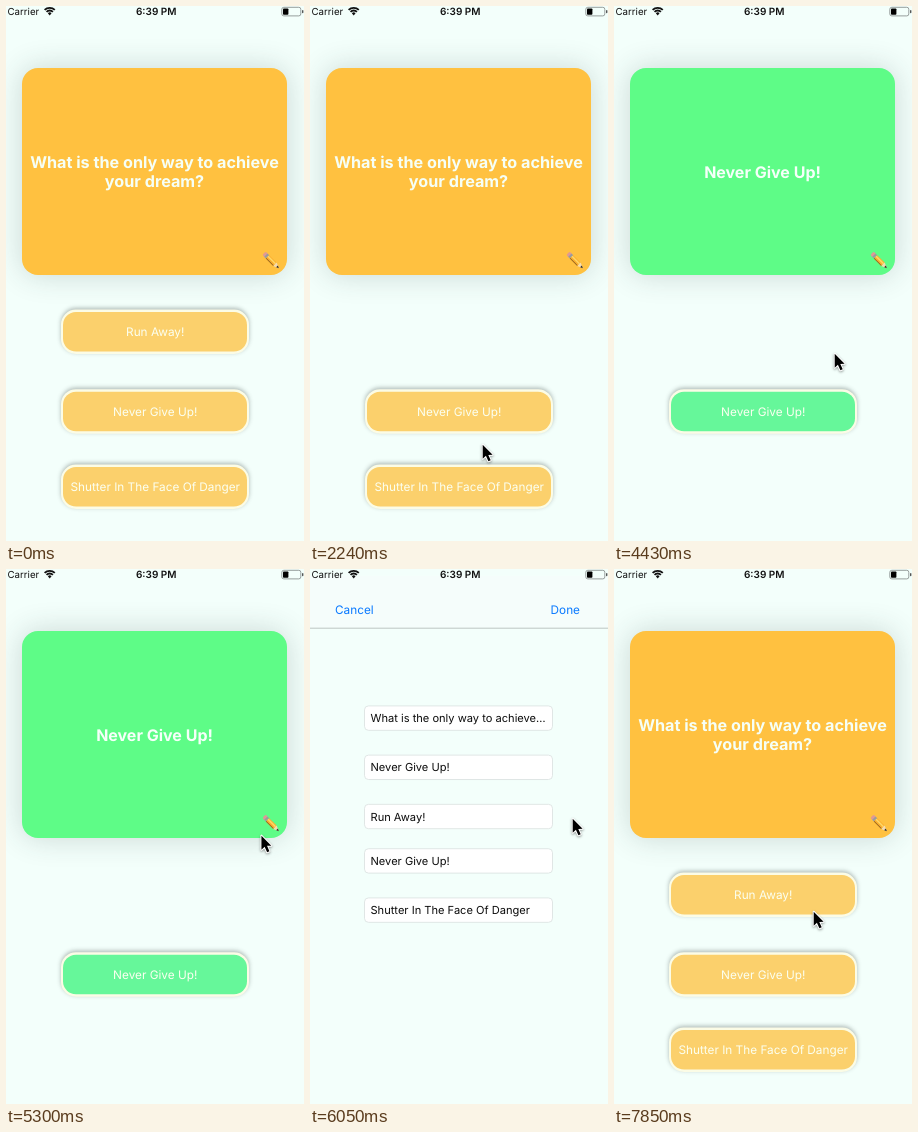
These frames come from a looping animation (298 px wide and 535 px high, 8000 ms). An HTML page with a canvas:

```html
<!DOCTYPE html>
<html lang="en">
<head>
<meta charset="utf-8">
<title>Flashcards</title>
<style>
html, body { margin: 0; width: 298px; height: 535px; overflow: hidden; background: #f3fffb; }
canvas { display: block; width: 298px; height: 535px; }
</style>
</head>
<body>
<canvas id="stage"></canvas>
<script>
const W = 298, H = 535, LOOP = 8000;
const canvas = document.getElementById('stage');
const c = canvas.getContext('2d');
const scale = window.devicePixelRatio || 1;
canvas.width = W * scale;
canvas.height = H * scale;

const BG = '#f3fffb', YELLOW = '#ffc140', GREEN = '#5efc87';
const PALE_YELLOW = '#fbd06c', PALE_GREEN = '#66f79a', BLUE = '#0a7aff';
const QUESTION = ['What is the only way to achieve', 'your dream?'];
const RIGHT = 'Never Give Up!', WRONG_A = 'Run Away!', WRONG_B = 'Shutter In The Face Of Danger';

const START = 300, STEP = 148.04, SLACK = 30;
const TAP_A = 1600, TAP_B = 2900, TAP_RIGHT = 3950;
const OPEN = 5652.7, TAP_DONE = 7050, CLOSE = 7258;

// The screen refreshes at a steady, low rate.
const refresh = t => t < START ? 0 : START + Math.floor((t - START + SLACK) / STEP) * STEP;

function ease(t, from, to) {
  const k = Math.min(1, Math.max(0, (t - from) / (to - from)));
  return k * k * (3 - 2 * k);
}

// Pointer moves: start, end, x, y
const moves = [
  [300, 1340, 174, 324],
  [2090, 2220, 172, 438],
  [2240, 2540, 172, 516],
  [2540, 2840, 172, 491],
  [3270, 3710, 171, 410],
  [4150, 4440, 220, 347],
  [4450, 5450, 262, 249],
  [6080, 6510, 248, 29],
  [6700, 7100, 246, 26],
  [7420, 7850, 199, 342],
];

function pointerAt(t) {
  let x = 290, y = 222;
  for (const [from, to, tx, ty] of moves) {
    const k = ease(t, from, to);
    x += (tx - x) * k;
    y += (ty - y) * k;
  }
  return [x, y];
}

function sheetTop(t) {
  if (t < OPEN) return H;
  return t < CLOSE ? H * Math.exp((OPEN - t) / 105) : H * ease(t, CLOSE, CLOSE + 342);
}

function box(x, y, w, h, r, fill) {
  c.beginPath();
  c.roundRect(x, y, w, h, r);
  c.fillStyle = fill;
  c.fill();
}

function text(str, x, cy, size, color, weight = 400, align = 'center') {
  c.font = `${weight} ${size}px Inter, "Open Sans", sans-serif`;
  c.textRendering = 'geometricPrecision';
  c.textAlign = align;
  c.fillStyle = color;
  c.fillText(str, x, cy + size * 0.37);
}

function shadow(color, blur, dy = 0) {
  c.shadowColor = color;
  c.shadowBlur = blur * scale;
  c.shadowOffsetY = dy * scale;
}

function statusBar() {
  text('Carrier', 1.5, 5.6, 9.7, '#111', 400, 'left');
  text('6:39 PM', 150.2, 5.6, 10, '#111', 600);
  c.strokeStyle = c.fillStyle = '#111';
  c.lineWidth = 1.8;
  for (const r of [7.2, 4.5]) {
    c.beginPath();
    c.arc(43.7, 9, r, -Math.PI * 0.75, -Math.PI * 0.25);
    c.stroke();
  }
  c.beginPath();
  c.moveTo(43.7, 9.4);
  c.arc(43.7, 9, 2.6, -Math.PI * 0.75, -Math.PI * 0.25);
  c.fill();
  c.strokeStyle = '#8d9492';
  c.lineWidth = 0.9;
  c.beginPath();
  c.roundRect(275.8, 1.3, 19, 8.6, 2);
  c.stroke();
  box(277, 2.5, 5.4, 6.2, 0.8, '#000');
  box(296, 4, 1.4, 3.2, 0.7, '#555');
}

function pencil() {
  const bar = (x, w, color, y = -2.4, h = 4.8) => {
    c.fillStyle = color;
    c.fillRect(x, y, w, h);
  };
  const tip = (x, h, color) => {
    c.fillStyle = color;
    c.beginPath();
    c.moveTo(x, -h);
    c.lineTo(21, 0);
    c.lineTo(x, h);
    c.fill();
  };
  c.save();
  c.translate(258, 247.3);
  c.rotate(Math.PI / 4);
  box(0, -2.4, 4, 4.8, 1.4, '#e09a94');
  bar(2.6, 2.4, '#9a9ca0');
  bar(5, 10.5, '#fbb030');
  bar(5, 10.5, '#ffd868', -1.5, 1.5);
  bar(5, 10.5, '#8a5a1c', 1.6, 0.8);
  tip(15.5, 2.4, '#f6dcb0');
  tip(18.4, 1.2, '#2d2a28');
  c.restore();
}

function card(solved) {
  c.save();
  shadow('rgba(40,60,60,0.2)', 30);
  box(16, 62, 265, 207, 16, solved ? GREEN : YELLOW);
  c.restore();
  if (solved) text(RIGHT, 148.5, 166, 16, '#f6fffa', 700);
  else QUESTION.forEach((line, i) => text(line, 148.5, 156.3 + i * 19, 16.2, '#f6fff6', 700));
  pencil();
}

function choice(label, y, fill, dim) {
  c.save();
  shadow('rgba(40,50,50,0.34)', 4, -1.5);
  box(55, y - 2.5, 188, 44.5, 15, '#fbfce6');
  c.restore();
  box(57, y, 184, 39.5, 13, fill);
  c.globalAlpha = dim ? 0.3 : 1;
  text(label, 149.2, y + 20.1, 11.8, '#fbfff0');
  c.globalAlpha = 1;
}

function sheet(top, doneAlpha) {
  if (top >= H) return;
  c.save();
  c.translate(0, top);
  c.fillStyle = BG;
  c.fillRect(0, -3, W, H + 3);
  c.fillStyle = '#f5fdfb';
  c.fillRect(0, -3, W, 52);
  c.fillStyle = '#b8bfbd';
  c.fillRect(0, 49, W, 0.9);
  text('Cancel', 25, 31.3, 11.8, BLUE, 400, 'left');
  c.globalAlpha = doneAlpha;
  text('Done', 270, 31.3, 11.8, BLUE, 400, 'right');
  c.globalAlpha = 1;
  [QUESTION[0] + '…', RIGHT, WRONG_A, RIGHT, WRONG_B].forEach((label, i) => {
    const cy = 139.4 + i * 49.2 - (i > 2 ? 4.8 : 0);
    box(54.5, cy - 12.2, 188, 24.4, 4, '#fff');
    c.strokeStyle = '#dde4e2';
    c.lineWidth = 0.9;
    c.stroke();
    text(label, 60.5, cy, 11.1, '#0c0c0c', 400, 'left');
  });
  c.restore();
}

const arrow = new Path2D('M0 0V14L3.2 11.1L5.7 16.6L8 15.6L5.6 10.2L9.9 10Z');

function pointer(x, y) {
  c.save();
  c.translate(x + 0.7, y + 0.7);
  c.lineJoin = 'round';
  c.lineWidth = 2;
  c.strokeStyle = '#fff';
  shadow('rgba(0,0,0,0.4)', 2.5, 1);
  c.stroke(arrow);
  shadow('transparent', 0);
  c.fillStyle = '#000';
  c.fill(arrow);
  c.restore();
}

function draw(t) {
  const reset = t > CLOSE + 50;
  const solved = t > TAP_RIGHT + STEP && !reset;
  const shown = tap => reset || t < tap + STEP;
  const pressed = tap => t >= tap && t < tap + STEP;
  c.setTransform(scale, 0, 0, scale, 0, 0);
  c.fillStyle = BG;
  c.fillRect(0, 0, W, H);
  card(solved);
  if (shown(TAP_A)) choice(WRONG_A, 306, PALE_YELLOW, pressed(TAP_A));
  choice(RIGHT, 385.7, solved ? PALE_GREEN : PALE_YELLOW, pressed(TAP_RIGHT));
  if (shown(TAP_B)) choice(WRONG_B, 461, PALE_YELLOW, pressed(TAP_B));
  sheet(sheetTop(t), t < TAP_DONE ? 1 : 0.2);
  statusBar();
  if (t >= START) pointer(...pointerAt(t));
}

function frame() {
  draw(refresh(performance.now() % LOOP));
  requestAnimationFrame(frame);
}
requestAnimationFrame(frame);
</script>
</body>
</html>
```
